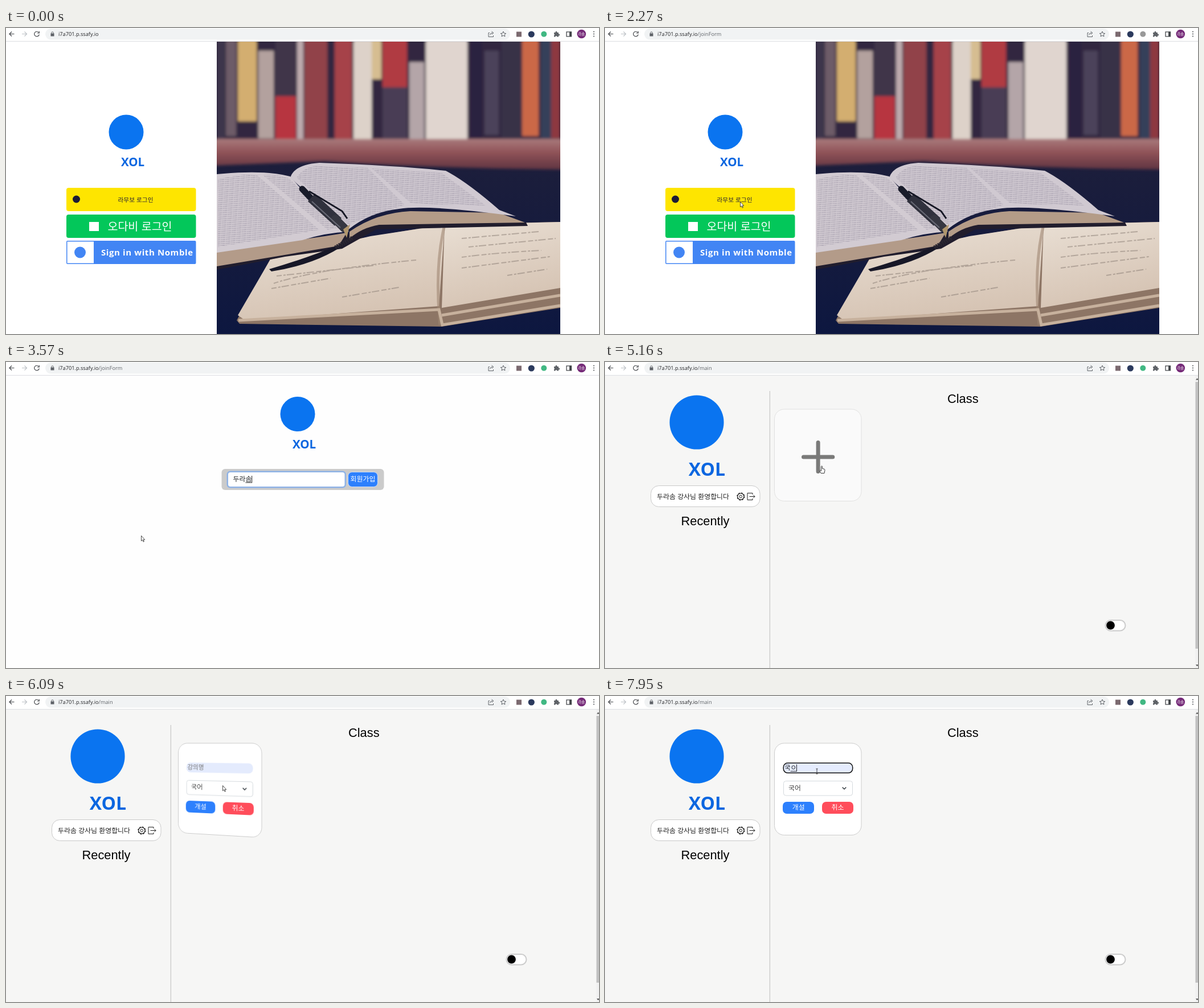
Write an HTML page that moves like this. It is 1041 by 538 pixels and loops after 8000 ms.

```html
<!DOCTYPE html>
<html lang="ko">
<head>
<title>Login and class creation</title>
<style>
  html, body { margin: 0; width: 100%; height: 100%; overflow: hidden; background: #fff; }
  svg { position: absolute; left: 0; top: 0; overflow: visible; }
  text { font: 11.9px "Noto Sans CJK KR", "Noto Sans CJK", sans-serif; white-space: pre; }
  .mid { text-anchor: middle; }
  .url { font: 9.2px "Open Sans", "Noto Sans", sans-serif; }
  .brand { font: 700 20.5px "Open Sans", sans-serif; text-anchor: middle; }
  .head { font: 21.8px "Liberation Sans", Arial, sans-serif; text-anchor: middle; }
  .line { fill: none; stroke: #5f6368; stroke-width: 1.2; }
  .face { left: 297px; top: 83px; transform-origin: 50% 0; }
</style>
</head>
<body>
<svg width="1041" height="538" viewBox="0 0 1041 538">
  <defs>
    <g id="logo">
      <circle r="30.5" fill="#0a74f0"/>
      <text class="brand" x="11.5" y="60" fill="#0b66e0">XOL</text>
    </g>
    <clipPath id="frame"><path d="M370 24H973V538H370Z"/></clipPath>
    <filter id="blur" x="-5%" width="110%"><feGaussianBlur stdDeviation="2.5"/></filter>
    <linearGradient id="shelf" x2="0" y2="1">
      <stop offset="0" stop-color="#a97a7c"/><stop offset=".45" stop-color="#8f5257"/><stop offset="1" stop-color="#5f3441"/>
    </linearGradient>
    <linearGradient id="table" x2="0" y2="1">
      <stop offset="0" stop-color="#272338"/><stop offset="1" stop-color="#0d1740"/>
    </linearGradient>
    <linearGradient id="paper" x2=".3" y2="1">
      <stop offset="0" stop-color="#e9dfd4"/><stop offset="1" stop-color="#d6c4b4"/>
    </linearGradient>
    <pattern id="print" width="9" height="3.4" patternUnits="userSpaceOnUse" patternTransform="rotate(4)">
      <path d="M0 1H5M6 1H8.5" stroke="#8a8296" stroke-width="1.1" opacity=".65"/>
    </pattern>
  </defs>

  <g id="login">
    <g clip-path="url(#frame)">
      <path d="M370 24H973V538H370Z" fill="url(#table)"/>
      <g filter="url(#blur)">
        <path d="M370 24H973V200H370Z" fill="#302841"/>
        <g id="spines"></g>
        <path d="M365 195H978V249Q700 245 560 234L365 242Z" fill="url(#shelf)"/>
      </g>
      <!-- notebook -->
      <path d="M405 514L464 406L610 372L770 345L973 341V492L765 525L410 520Z" fill="#8d7565"/>
      <path d="M407 505L464 407L640 366L770 346L760 489L420 514Z" fill="url(#paper)"/>
      <path d="M770 346L973 341V457L765 492Z" fill="url(#paper)"/>
      <path d="M770 346Q752 420 762 522" fill="none" stroke="#a08773" stroke-width="5" opacity=".6"/>
      <path d="M408 514L760 495L766 522L973 488M765 505L973 470" fill="none" stroke="#c7b19d" stroke-width="5"/>
      <path d="M470 449Q540 425 720 408M475 436L650 417M466 458L570 440M590 473L690 456M800 370L935 358M812 385L965 370M800 403Q860 395 940 391M800 422L955 402M880 435L950 424"
        fill="none" stroke="#8f8178" stroke-width="2" stroke-dasharray="9 3 4 2 13 4" opacity=".55"/>
      <!-- open book -->
      <path d="M370 412L570 377L605 360L660 343L913 342L916 348L650 354L590 388L490 402L370 425Z" fill="#211d2d"/>
      <path d="M370 393L560 366L598 360L584 383L370 419Z" fill="#b39b89"/>
      <path d="M603 358Q650 325 710 322L865 325L911 342L655 346Q625 351 603 370Z" fill="#b49c88"/>
      <path d="M370 257Q455 249 499 261L517 282L602 358Q560 360 520 373L370 395Z" fill="#d2cbd2"/>
      <path d="M499 263Q506 240 550 237Q690 242 772 251Q810 271 866 320L895 331Q740 310 690 318Q640 323 600 355Z" fill="#d0c9d1"/>
      <path d="M372 266Q420 255 440 258L550 355L372 385ZM450 258Q485 257 497 265L588 350L565 355Z" fill="url(#print)"/>
      <path d="M510 263Q525 242 550 242L635 246L700 311L600 345ZM642 247L765 255L842 312L712 309Z" fill="url(#print)"/>
      <path d="M462 424Q530 404 583 382L607 371Q555 414 466 428Z" fill="#171727"/>
      <!-- pen -->
      <path d="M520 283L536 300" stroke="#191c2a" stroke-width="11" stroke-linecap="round"/>
      <path d="M536 298L583 341" stroke="#30313d" stroke-width="18"/>
      <path d="M578 336L594 352" stroke="#363741" stroke-width="15" stroke-linecap="round"/>
      <path d="M532 287L590 322L599 335" fill="none" stroke="#151724" stroke-width="3"/>
      <path d="M537 305L587 351" stroke="#696a76" stroke-width="2"/>
      <path d="M592 354L604 345L598 369Z" fill="#af956c"/>
      <path d="M608 369L578 386" stroke="#292530" stroke-width="7" stroke-dasharray="3 1"/>
    </g>
    <use href="#logo" x="211" y="183"/>
    <rect x="106" y="281" width="227.5" height="41" rx="4" fill="#fee500"/>
    <circle cx="123.5" cy="301" r="6.5" fill="#1d1b35"/>
    <text class="mid" x="227.5" y="306" style="font-size:10.7px" fill="#2b2433">&#46972;&#47924;&#48372; &#47196;&#44536;&#51064;</text>
    <rect x="106" y="328" width="227.5" height="41" rx="4" fill="#03c75a"/>
    <path d="M146 341H163V357H146Z" fill="#fff"/>
    <text class="mid" x="235" y="356" style="font-size:19.5px;font-weight:300" fill="#fff">&#50724;&#45796;&#48708; &#47196;&#44536;&#51064;</text>
    <rect x="106" y="374" width="227.5" height="41" rx="2" fill="#4285f4"/>
    <path d="M107.5 375.5H154V413.5H107.5Z" fill="#fff"/>
    <circle cx="130" cy="394.5" r="10" fill="#4285f4"/>
    <text x="167" y="400" style="font:700 15px 'Open Sans',sans-serif;letter-spacing:.6px" fill="#fff">Sign in with Nomble</text>
  </g>

  <g id="join">
    <path d="M0 24H1041V538H0Z" fill="#fefefe"/>
    <use href="#logo" x="512" y="91.5"/>
    <rect x="378.5" y="188" width="285" height="37" rx="6" fill="#cbcbcb"/>
    <rect id="focusRing" x="389" y="193" width="206.5" height="27" rx="4.5" fill="none" stroke="#8fb3e6" stroke-width="3"/>
    <rect x="390" y="194" width="204.5" height="25" rx="4" fill="#fff"/>
    <text id="nameHint" class="mid" x="492.5" y="210" fill="#6c757d">&#51060;&#47492;&#51012; &#51077;&#47141;&#54644;&#51452;&#49464;&#50836;</text>
    <g id="nameField"></g>
    <rect x="600.5" y="193.5" width="52" height="26" rx="7" fill="#2d80fd" stroke="#e4edfb" stroke-width=".8"/>
    <text class="mid" x="626.5" y="210" fill="#fff">&#54924;&#50896;&#44032;&#51077;</text>
  </g>

  <g id="main">
    <path d="M0 24H1041V538H0Z" fill="#f6f6f5"/>
    <g transform="translate(161 106) scale(1.56)"><use href="#logo"/></g>
    <rect x="80.5" y="217.5" width="191.5" height="37" rx="14" fill="#fff" stroke="#c9c9c9"/>
    <text x="91" y="240.5" fill="#222">&#46160;&#46972;&#49564; &#44053;&#49324;&#45784; &#54872;&#50689;&#54633;&#45768;&#45796;</text>
    <g fill="none" stroke="#222">
      <circle cx="238.3" cy="236.5" r="5.6" stroke-width="1.2"/>
      <circle cx="238.3" cy="236.5" r="6.4" stroke-width="1.3" stroke-dasharray="2.5 2.53"/>
      <circle cx="238.3" cy="236.5" r="2.3"/>
      <path d="M259 233V230.5H250V242.5H259V240M253.5 236.5H263M260.5 234L263 236.5L260.5 239"/>
    </g>
    <text class="head" x="176" y="287">Recently</text>
    <text class="head" x="628.3" y="72">Class</text>
    <path d="M289.3 51V538" stroke="#bdbdbd"/>
    <rect x="878.5" y="454" width="35" height="18.5" rx="9.2" fill="#fff" stroke="#ccc" stroke-width="2"/>
    <circle cx="887.5" cy="463" r="7.4"/>
    <path d="M1036 24H1041V538H1036Z" fill="#f1f1f1"/>
    <path d="M1036.5 35H1041V504H1036.5Z" fill="#c1c1c1"/>
    <path d="M1037 31.5L1039.5 28.5L1042 31.5ZM1037 532L1039.5 535L1042 532Z" fill="#555"/>
  </g>

  <path d="M0 0H1041V23H0Z" fill="#fff"/>
  <path d="M0 23.4H1041" stroke="#dadce0"/>
  <rect x="69" y="1" width="816" height="19.5" rx="9.7" fill="#f1f3f4"/>
  <path class="line" d="M14.5 10.5H6M10 6.5L6 10.5L10 14.5" style="stroke:#45484c"/>
  <path class="line" d="M28 10.5H36.5M32.5 6.5L36.5 10.5L32.5 14.5" style="stroke:#bdc1c6"/>
  <path id="reload" class="line" d="M57.3 7.7A4.3 4.3 0 1 0 58.3 11.3M58.3 5.7V9H55" style="stroke:#45484c"/>
  <path id="stop" class="line" d="M50.5 7L57.5 14M57.5 7L50.5 14" style="stroke:#45484c"/>
  <path d="M78.5 9.5H84.5V14.5H78.5Z" fill="#5f6368"/>
  <path class="line" d="M79.8 10V8.5A1.7 1.7 0 0 1 83.2 8.5V10" style="stroke-width:1"/>
  <text class="url" x="92" y="14" fill="#202124">i7a701.p.ssafy.io<tspan id="path" fill="#5f6368"></tspan></text>
  <path class="line" d="M849 8.5H847V15.5H855.5V13M849.5 12.5Q850 8.7 854 8.5M852.5 6L856 8.7L852.5 11.2" style="stroke-width:1"/>
  <path class="line" d="M873 6L874.4 9.2L877.8 9.5L875.2 11.7L876 15L873 13.2L870 15L870.8 11.7L868.2 9.5L871.6 9.2Z" style="stroke-width:1"/>
  <path d="M896 6.5H905V15.5H896Z" fill="#7c6a70"/>
  <circle cx="922.3" cy="11" r="5.6" fill="#2b3a5d"/>
  <circle id="extension" cx="944.3" cy="10.7" r="5"/>
  <path d="M962 8H964.5A1.6 1.6 0 1 1 967.5 8H970V10.7A1.5 1.5 0 1 1 970 13.3V15.5H967.5A1.6 1.6 0 0 0 964.3 15.5H962V13A1.5 1.5 0 0 0 962 10.3Z" fill="#5f6368"/>
  <path d="M984 6.8H992.5V14.8H984Z" fill="none" stroke="#45484c" stroke-width="1.3"/>
  <path d="M989 6.5H992.5V15H989Z" fill="#45484c"/>
  <circle cx="1010.3" cy="10.5" r="7.8" fill="#752a78"/>
  <text class="mid" x="1010.3" y="13" style="font-size:6.3px" fill="#fff">&#46972;&#49564;</text>
  <path d="M1032 6.5V15.5" stroke="#45484c" stroke-width="1.9" stroke-linecap="round" stroke-dasharray="0 4"/>
</svg>

<svg id="front" class="face" width="154" height="162" viewBox="297 83 154 162">
  <rect x="297.5" y="83" width="152.5" height="161.5" rx="17" fill="#fff" stroke="#ccc"/>
  <path d="M348.5 167H399.8M374.1 141.5V192.5" stroke="#000" stroke-width="7" stroke-linecap="round"/>
</svg>
<svg id="back" class="face" width="154" height="162" viewBox="297 83 154 162">
  <rect x="297.5" y="83" width="152.5" height="161.5" rx="17" fill="#fff" stroke="#ccc"/>
  <rect id="classInput" x="313.2" y="117.8" width="121.5" height="17.5" rx="7.5" fill="#e4ebfd" stroke-width="1.5"/>
  <text id="classHint" x="315" y="130.3" style="font-size:11.3px" fill="#757575">&#44053;&#51032;&#47749;</text>
  <g id="classField"></g>
  <rect x="313.5" y="149.5" width="121" height="25.5" rx="4" fill="#fff" stroke="#d5dade"/>
  <text x="322" y="165.5" fill="#444">&#44397;&#50612;</text>
  <path d="M416.7 160.5L420 163.8L423.3 160.5" fill="none" stroke="#343a40" stroke-width="1.5"/>
  <rect x="312" y="186" width="55" height="21" rx="7" fill="#2d80fd"/>
  <text class="mid" x="339.7" y="200.3" fill="#fff">&#44060;&#49444;</text>
  <rect x="381" y="186" width="55" height="21" rx="7" fill="#ff4d5b"/>
  <text class="mid" x="408.5" y="200.3" fill="#fff">&#52712;&#49548;</text>
</svg>

<svg width="1041" height="538" viewBox="0 0 1041 538">
  <g id="cursor">
    <circle id="click" r="8" fill="#ff0" opacity=".47"/>
    <path id="arrow" d="M0 0V9.2L2.1 7.3L3.6 10.7L4.9 10.1L3.5 6.9H6.2Z" fill="#fff" stroke="#222" stroke-width=".8"/>
    <path id="hand" d="M-1 1Q0-.6 1 1V5L4.5 5.7Q5.7 6.2 5.4 8L4.5 13H-1.4L-4 8.7Q-3.6 7-1 9Z" fill="#fff" stroke="#222" stroke-width=".9"/>
    <path id="ibeam" d="M-1.6-4.5H1.6M0-4.5V4.5M-1.6 4.5H1.6" stroke="#333" stroke-width=".9"/>
  </g>
</svg>

<script>
const LOOP = 8000;
const $ = id => document.getElementById(id);
const show = (id, on) => { $(id).style.display = on ? '' : 'none'; };
const between = (t, a, b) => t >= a && t < b;
const clamp = v => Math.min(1, Math.max(0, v));
const last = (steps, t) => steps.filter(s => s[0] <= t).pop();

// Book spines: left, width, top, bottom, colour
$('spines').innerHTML = [
  [370, 14, 20, 198, '#3d344b'], [386, 18, 20, 190, '#6d5c68'], [407, 33, 20, 164, '#d3ae70'],
  [443, 27, 40, 194, '#b3a19e'], [473, 36, 20, 120, '#403549'], [473, 36, 120, 198, '#b73540'],
  [511, 11, 20, 198, '#bdaaad'], [524, 40, 20, 198, '#91424a'], [577, 30, 20, 198, '#a6424a'],
  [610, 32, 20, 196, '#ddd2c9'], [642, 17, 20, 90, '#d6bd91'], [661, 43, 20, 104, '#b03a43'],
  [661, 43, 104, 196, '#4a3e54'], [708, 26, 60, 196, '#b4a5a8'], [737, 73, 20, 196, '#e0d5cf'],
  [816, 20, 20, 194, '#292440'], [840, 25, 40, 188, '#4c435a'], [870, 34, 20, 194, '#373047'],
  [906, 29, 20, 190, '#cb6847'], [939, 18, 20, 194, '#34405a'], [957, 16, 20, 194, '#8d3941']
].map(([x, w, y, y2, c]) => `<path d="M${x} ${y}h${w}V${y2}h-${w}Z" fill="${c}"/>`).join('');

// CSS "ease" timing curve
function ease(x) {
  const bez = (a, b, u) => 3 * a * u * (1 - u) ** 2 + 3 * b * u * u * (1 - u) + u ** 3;
  let lo = 0, hi = 1;
  for (let i = 0; i < 20; i++) {
    const m = (lo + hi) / 2;
    if (bez(.25, .25, m) < x) lo = m; else hi = m;
  }
  return bez(.1, 1, lo);
}

// Hangul input: the last syllable is underlined while composing
function typed(id, text, x, y, size, caret) {
  const step = size * .92, end = x + step * text.length;
  $(id).innerHTML = `<text x="${x}" y="${y}" style="font-size:${size}px" fill="#212529">${text}</text>` +
    (text ? `<path d="M${end - step} ${y + 2}H${end}" stroke="#333"/>` : '') +
    (caret ? `<path d="M${end + .3} ${y - 10}V${y + 2.5}" stroke="#222"/>` : '');
}

const route = [[630, 380, 23], [1290, 237.5, 305.5], [4850, 237.5, 305.5], [5160, 380.5, 182.5],
  [5640, 380.5, 182.5], [6020, 380.5, 157.5], [6120, 380.5, 157.5], [6400, 375, 138], [6500, 372, 132.5]];
function pointer(t) {
  const i = route.findIndex(p => p[0] > t);
  if (i < 1) return (i ? route[route.length - 1] : route[0]).slice(1);
  const [t0, x0, y0] = route[i - 1], [t1, x1, y1] = route[i];
  const k = (t - t0) / (t1 - t0), s = k * k * (3 - 2 * k);
  return [x0 + (x1 - x0) * s, y0 + (y1 - y0) * s];
}

const nameSteps = [[0, ''], [2790, '\u3137'], [2830, '\uB450'], [3040, '\uB458'], [3150, '\uB450\uB77C'],
  [3260, '\uB450\uB78F'], [3360, '\uB450\uB77C\uC18C'], [3570, '\uB450\uB77C\uC19C']];
const classSteps = [[0, ''], [6940, '\u3131'], [7140, '\uAD6C'], [7270, '\uAD6D'], [7950, '\uAD6D\u3147']];

function draw(t) {
  const onLogin = t < 2310, onMain = t >= 4010;
  show('login', onLogin);
  show('join', !onLogin && !onMain);
  show('main', onMain);
  $('path').textContent = onMain ? '/main' : t >= 2110 ? '/joinForm' : '';
  show('stop', between(t, 1930, 2110));
  show('reload', !between(t, 1930, 2110));
  $('extension').setAttribute('fill', between(t, 2110, 2430) ? '#999' : '#41b883');

  const name = last(nameSteps, t)[1];
  $('focusRing').style.opacity = clamp((t - 2370) / 60);
  show('nameHint', !name);
  typed('nameField', name, 398.5, 210, 11.9, true);

  const angle = 180 * ease(clamp((t - 5580) / 800));
  const [x, y] = pointer(t);
  const onCard = onMain && x > 297 && y < 245;
  show('front', onMain && angle < 90);
  show('back', onMain && angle >= 90);
  $('front').style.opacity = onCard ? .5 : 1;
  $('front').style.transform = angle ? `perspective(800px) rotateY(${angle}deg)` : '';
  $('back').style.transform = t < 6380 ? `perspective(800px) rotateY(${angle - 180}deg)` : '';

  const label = last(classSteps, t)[1], focused = t >= 6740;
  $('classInput').setAttribute('stroke', focused ? '#111' : 'none');
  show('classHint', !label);
  typed('classField', label, 315, 130.3, 11.5, focused && !between(t, 7710, 7780));

  const hand = t < 1930 ? x > 106 && x < 333 && y > 281 : onCard && angle < 90;
  const ibeam = onCard && angle >= 90 && y < 136;
  show('cursor', t >= 630);
  $('cursor').setAttribute('transform', `translate(${x} ${y})`);
  show('hand', hand);
  show('ibeam', ibeam);
  show('arrow', !hand && !ibeam);
  show('click', between(t, 1700, 1930) || between(t, 5390, 5600) || between(t, 6740, 6940));
}

const start = performance.now();
function tick() {
  draw((performance.now() - start) % LOOP);
  requestAnimationFrame(tick);
}
tick();
</script>
</body>
</html>
```
